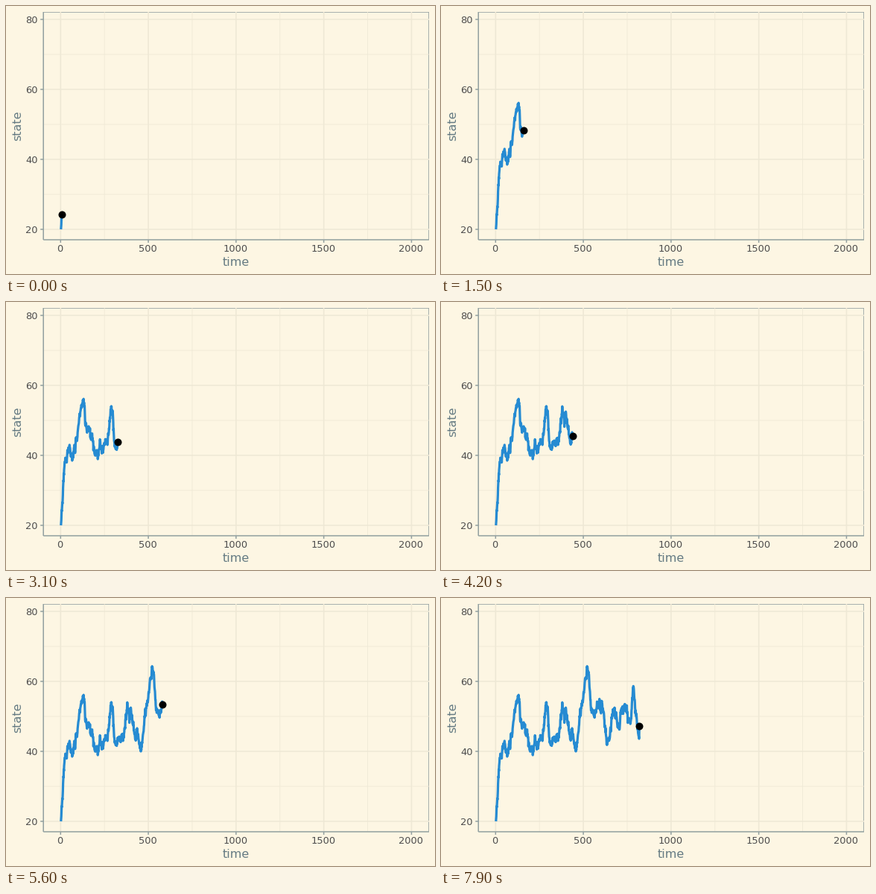
Write a matplotlib script that moves like this. It is 576 by 360 pixels and loops after 8000 ms.

```python
import numpy as np
import matplotlib.pyplot as plt
from matplotlib.animation import FuncAnimation

W, H, DPI = 576, 360, 72
FRAMES, INTERVAL = 80, 100
LEFT, RIGHT, TOP, BOTTOM = 50.2, 568, 8, 314

PAPER, GRID, AXIS = "#fdf6e3", "#eee8d5", "#93a1a1"
TITLE, LABEL, BLUE = "#657b83", "#4d4d4d", "#268bd2"

# Main swings of the walk: time, state
SWINGS = [
    (2, 20), (23, 38), (51, 43), (66, 38.5), (100, 48), (125, 55),
    (151, 46.5), (160, 48.3), (197, 40), (267, 43), (290, 54), (308, 42.5),
    (325, 43.8), (356, 43), (380, 54), (400, 52.5), (426, 43.5), (438, 45.6),
    (466, 43), (512, 61), (532, 62), (545, 52), (570, 51), (582, 53.4),
    (617, 51), (633, 42), (678, 52.5), (696, 46.8), (737, 53.5), (769, 48),
    (786, 58.5), (818, 43.6), (819, 47.2),
]


def px(t):
    return 73.3 + 0.23557 * t


def py(s):
    return 300 - 4.7 * (s - 20)


def build_walk(swings, pull=0.85, sigma=0.7, seed=4):
    """Straight swings plus mean-reverting noise that fades at each turn."""
    rng = np.random.default_rng(seed)
    ts, states = [swings[0][0]], [swings[0][1]]
    for (t0, s0), (t1, s1) in zip(swings, swings[1:]):
        noise = 0
        for t in range(t0 + 1, t1 + 1):
            u = (t - t0) / (t1 - t0)
            noise = pull * noise + rng.normal(0, sigma)
            ts.append(t)
            states.append(s0 + (s1 - s0) * u + 2 * noise * (u * (1 - u)) ** 0.5)
    return np.array(ts), np.array(states)


fig = plt.figure(figsize=(W / DPI, H / DPI), dpi=DPI, facecolor=PAPER)
ax = fig.add_axes([0, 0, 1, 1])
ax.set_xlim(0, W)
ax.set_ylim(H, 0)
ax.axis("off")


def rule(x0, y0, x1, y1, color, width, z):
    ax.plot([x0, x1], [y0, y1], color=color, lw=width, zorder=z,
            solid_capstyle="butt", snap=False)


def label(x, y, text, color=LABEL, size=13, ha="center", rotation=0):
    ax.text(x, y, text, color=color, fontsize=size, family="DejaVu Sans",
            ha=ha, va="baseline", rotation=rotation, rotation_mode="anchor")


# Thin frame below the grid
rule(LEFT, TOP + 0.4, RIGHT, TOP + 0.4, AXIS, 0.8, 1)
rule(RIGHT - 0.4, TOP, RIGHT - 0.4, BOTTOM, AXIS, 0.8, 1)

for t in range(250, 2000, 500):
    rule(px(t), TOP, px(t), BOTTOM, GRID, 0.78, 2)
for s in (30, 50, 70):
    rule(LEFT, py(s), RIGHT, py(s), GRID, 0.78, 2)

for t in range(0, 2001, 500):
    rule(px(t), TOP, px(t), BOTTOM, GRID, 1.55, 3)
    rule(px(t), BOTTOM, px(t), BOTTOM + 4, AXIS, 1.55, 5)
    label(px(t) - 0.6, 330.5, str(t))
for s in (20, 40, 60, 80):
    rule(LEFT, py(s), RIGHT, py(s), GRID, 1.55, 3)
    rule(LEFT - 4, py(s), LEFT, py(s), AXIS, 1.55, 5)
    label(42.6, py(s) + 4.7, str(s), ha="right")

rule(LEFT, TOP, LEFT, BOTTOM, AXIS, 1.55, 6)
rule(LEFT, BOTTOM, RIGHT, BOTTOM, AXIS, 1.55, 6)
label(308.4, 349, "time", TITLE, 16)
label(20.5, 160.4, "state", TITLE, 16, rotation=90)

ts, states = build_walk(SWINGS)
trail, = ax.plot([], [], color=BLUE, lw=3.2, zorder=4, snap=False,
                 solid_joinstyle="round", solid_capstyle="butt")
dot, = ax.plot([], [], "o", color="black", ms=10, mew=0, zorder=5, snap=False)


def draw(i):
    now = 5.9 + 10.294 * i
    state = np.interp(now, ts, states)
    past = ts < now
    trail.set_data(px(np.append(ts[past], now)),
                   py(np.append(states[past], state)))
    dot.set_data([px(now)], [py(state)])
    return trail, dot


anim = FuncAnimation(fig, draw, frames=FRAMES, interval=INTERVAL,
                     repeat=True, repeat_delay=0)
plt.show()
```
